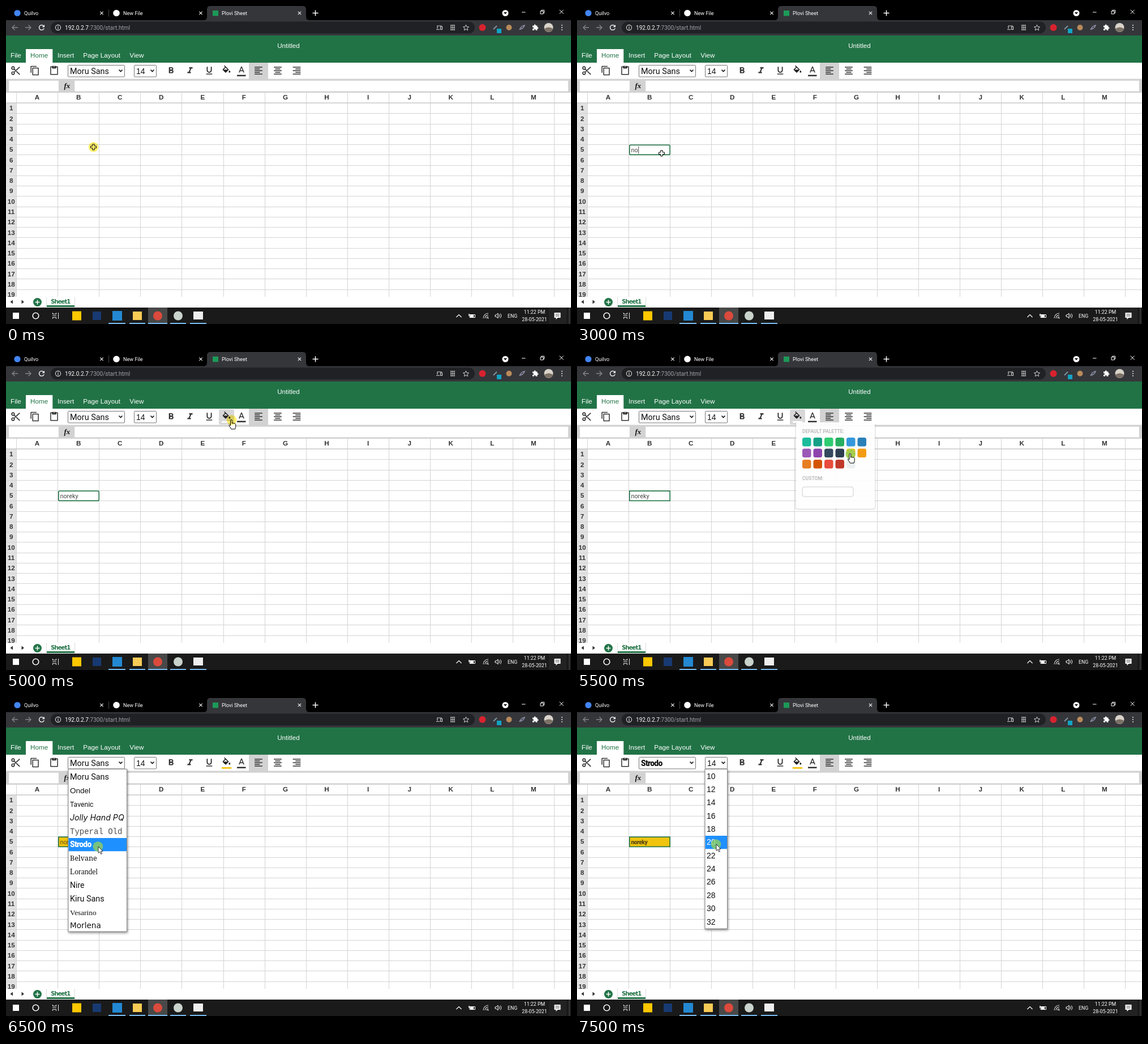
Recreate the animation shown at these times as an HTML page. Size 998x561 px, loop 8000 ms.

```html
<!DOCTYPE html>
<html lang="en">
<head>
<meta charset="utf-8">
<title>Spreadsheet</title>
<style>
html, body { margin: 0; width: 100%; height: 100%; overflow: hidden; background: #fff; }
svg { display: block; width: 100%; height: 100%; }
text { white-space: pre; }
.glow { mix-blend-mode: multiply; }
.shadow { filter: drop-shadow(1.5px 2px 2px rgba(0, 0, 0, .45)); }
</style>
</head>
<body>
<svg id="stage" viewBox="0 0 998 561"><g id="base"></g><g id="live"></g></svg>
<script>
const UI = 'Roboto, sans-serif';
const SANS = '"Liberation Sans", sans-serif';
const SERIF = '"Liberation Serif", serif';
const GREEN = '#217346', INK = '#333', YELLOW = '#f1c40f', GRAY = '#d2d2d2';
const COL = 73.06, ROW = 18.26, GRID_X = 18.7, GRID_Y = 171.5, LABEL = 11.69;

const rect = (x, y, w, h, fill, more = '') =>
  `<rect x="${x}" y="${y}" width="${w}" height="${h}" fill="${fill}" ${more}/>`;
const disc = (x, y, r, fill, more = '') =>
  `<circle cx="${x}" cy="${y}" r="${r}" fill="${fill}" ${more}/>`;
const fillPath = (d, fill, more = '') => `<path d="${d}" fill="${fill}" ${more}/>`;
const line = (d, color, width = 1, more = '') =>
  `<path d="${d}" fill="none" stroke="${color}" stroke-width="${width}" ${more}/>`;
const text = (s, x, y, size, fill, font = UI, more = '') =>
  `<text x="${x}" y="${y}" font-size="${size}" fill="${fill}" style='font-family:${font}' ${more}>${s}</text>`;
const at = (x, y, body, k = 1) => `<g transform="translate(${x} ${y}) scale(${k})">${body}</g>`;
// Icon drawn on a 24 unit box, centred on x, y
const icon = (x, y, body, k = 0.76) => at(x - 12 * k, y - 12 * k, body, k);
const MID = 'text-anchor="middle"';
const BOLD_MID = MID + ' font-weight="700"';

const ICONS = {
  cut: line('M8.5 8.5L21.5 21M8.5 15.5L21.5 3.5M3 6a3 3 0 1 0 6 0a3 3 0 1 0-6 0M3 18a3 3 0 1 0 6 0a3 3 0 1 0-6 0', INK, 2.2),
  copy: line('M3 17V2H16M7 6H20V22H7Z', INK, 2, 'stroke-linejoin="round"'),
  paste: line('M4 3H20V21H4Z', INK, 2, 'stroke-linejoin="round"') + rect(7, 1, 10, 6, INK, 'rx="1"') + disc(12, 3, 1, '#fff'),
  bold: fillPath('M15.6 10.79c.97-.67 1.65-1.77 1.65-2.79 0-2.26-1.75-4-4-4H7v14h7.04c2.09 0 3.71-1.7 3.71-3.79 0-1.52-.86-2.82-2.15-3.42zM10 6.5h3c.83 0 1.5.67 1.5 1.5s-.67 1.5-1.5 1.5h-3v-3zm3.5 9H10v-3h3.5c.83 0 1.5.67 1.5 1.5s-.67 1.5-1.5 1.5z', INK),
  italic: fillPath('M10 4v3h2.21l-3.42 8H6v3h8v-3h-2.21l3.42-8H18V4z', INK),
  underline: fillPath('M12 17c3.31 0 6-2.69 6-6V3h-2.5v8c0 1.93-1.57 3.5-3.5 3.5S8.5 12.93 8.5 11V3H6v8c0 3.31 2.69 6 6 6zm-7 2v2h14v-2H5z', INK),
  bucket: fillPath('M16.56 8.94L7.62 0 6.21 1.41l2.38 2.38-5.15 5.15c-.59.59-.59 1.54 0 2.12l5.5 5.5c.6.6 1.5.6 2.12 0l5.5-5.5c.59-.58.59-1.53 0-2.12zM10 5.2L14.8 10H5.2zM19 11.5s-2 2.17-2 3.5c0 1.1.9 2 2 2s2-.9 2-2c0-1.33-2-3.5-2-3.5z', '#222'),
  color: fillPath('M11 3L5.5 17h2.25l1.12-3h6.25l1.12 3h2.25L13 3h-2zm-1.38 9L12 5.67 14.38 12H9.62z', INK),
  reload: fillPath('M17.65 6.35C16.2 4.9 14.21 4 12 4c-4.42 0-8 3.58-8 8s3.57 8 8 8c3.73 0 6.84-2.55 7.73-6h-2.08c-.82 2.33-3.04 4-5.65 4-3.31 0-6-2.69-6-6s2.69-6 6-6c1.66 0 3.14.69 4.22 1.78L13 11h7V4l-2.35 2.35z', '#fff'),
  puzzle: fillPath('M20.5 11H19V7c0-1.1-.9-2-2-2h-4V3.5C13 2.1 11.9 1 10.5 1S8 2.1 8 3.5V5H4c-1.1 0-2 .9-2 2v3.8h1.5a2.7 2.7 0 0 1 0 5.4H2V20c0 1.1.9 2 2 2h3.8v-1.5a2.7 2.7 0 0 1 5.4 0V22H17c1.1 0 2-.9 2-2v-4h1.5a2.5 2.5 0 0 0 0-5z', '#fff'),
  star: line('M12 3l2.7 6.3 6.8.6-5.2 4.5 1.6 6.7-5.9-3.6-5.9 3.6 1.6-6.7-5.2-4.5 6.8-.6z', '#ddd', 1.8),
};
const alignIcon = side => [18, 12, 18, 12, 18]
  .map((w, i) => rect(3 + (18 - w) * side, 3 + 4 * i, w, 2, INK)).join('');

function browser() {
  const close = x => line(`M${x - 2.7} 9.8l5.4 5.4m0-5.4l-5.4 5.4`, '#eee', 1.2);
  let s = rect(0, 0, 998, 26, '#000') + rect(0, 25, 998, 27, '#35363a');
  s += fillPath('M349 25q6 0 6-6V6q0-6 6-6H524q6 0 6 6V19q0 6 6 6z', '#35363a');
  s += rect(181, 6, 1, 13, '#4a4c50');
  s += disc(20, 12.5, 5.6, '#4285f4') + disc(195, 12.5, 5.8, '#fff') + rect(365, 8, 10, 9.5, '#1d9a58');
  s += text('Quilvo', 32, 15.8, 9.1, '#fff') + text('New File', 207, 15.8, 9.1, '#fff') + text('Plovi Sheet', 381, 15.8, 9.1, '#fff');
  s += [169, 344, 518.5].map(close).join('') + line('M541.5 12.5h10M546.5 7.5v10', '#fff', 1.5);
  s += disc(882, 12.5, 5.5, '#fff') + fillPath('M879 11h6l-3 3.5z', '#000');
  s += line('M911 11h6.500M944 9h5v5h-5zM945.7 9V7.300h5v5h-1.700M977.700 6.700l7 7m0-7l-7 7', '#fff');
  s += line('M21 38H11m4.500-4.500L11 38l4.500 4.500M34 38h10m-4.500-4.500L44 38l-4.500 4.500', '#85878b', 1.3);
  s += icon(63, 38, ICONS.reload, 0.63) + rect(79, 27.5, 749, 21, '#202124', 'rx="10.5"');
  s += disc(92, 38, 4.6, 'none', 'stroke="#ddd" stroke-width="1.100"') + rect(91.4, 37.2, 1.2, 3.5, '#ddd') + rect(91.4, 35, 1.2, 1.3, '#ddd');
  s += text('192.0.2.7<tspan fill="#9aa0a6">:7300/start.html</tspan>', 104, 41.6, 10.1, '#fff');
  s += line('M762 40v-5h8M760 41.500h6M767.500 36.500h3v5h-3z', '#ccc', 1.2);
  s += line('M785 34h8M785 38h8M785 42h8M786 33v10M792 33v10M789 33v10', '#bbb', 1.1);
  s += icon(812.5, 38, ICONS.star, 0.53);
  s += disc(841.5, 38, 6, '#d8232f') + line('M861 41l6-6', '#7f94a4', 2) + rect(867, 40, 8, 8, '#12a4c4');
  s += disc(888.5, 38, 5, '#b98a5a') + line('M907 42q3-7 9-8q-2 6-8 7', '#8d90a8', 1.6);
  s += icon(935, 38, ICONS.puzzle, 0.5) + disc(958.5, 38, 8, '#d9d3ca') + fillPath('M950.800 40q8-5 15.400 0a8 8 0 0 1-15.400 0z', '#7b7166');
  return s + [34, 38, 42].map(y => disc(982, y, 1.1, '#ddd')).join('');
}

function toolbar() {
  let s = rect(0, 52, 998, 48, GREEN) + text('Untitled', 499, 74, LABEL, '#fff', SANS, MID);
  s += rect(35, 76, 47.3, 24, '#fff');
  [['File', 8], ['Home', 43], ['Insert', 91], ['Page Layout', 136.3], ['View', 218.3]]
    .forEach(([label, x]) => s += text(label, x, 91.2, LABEL, x === 43 ? GREEN : '#fff', SANS));
  s += rect(0, 100, 998, 29, '#fff') + rect(429, 100, 34, 29, GRAY);
  [['cut', 17], ['copy', 51], ['paste', 85], ['bold', 291.5], ['italic', 325], ['underline', 359], ['color', 416]]
    .forEach(([name, x]) => s += icon(x, name === 'color' ? 113.5 : 114, ICONS[name]));
  s += rect(408, 121.5, 15.5, 2.5, INK);
  [446, 480, 513.5].forEach((x, i) => s += icon(x, 114, alignIcon(i / 2)));
  s += rect(0, 128.5, 998, 24.5, GRAY) + rect(5.2, 131.8, 87.7, 18.6, '#fff') + rect(121.2, 131.8, 871.6, 18.6, '#fff');
  return s + text('fx', 102.5, 145, 13, '#111', SERIF, 'font-style="italic" font-weight="700"');
}

function grid() {
  let s = rect(0, 153, 998, 360, '#fff') + rect(0, 171, 18, 342, '#e2e2e2');
  for (let c = 0; c < 14; c++) {
    const x = GRID_X + c * COL;
    s += line(`M${Math.floor(x) + 0.5} 153V513`, '#d4d4d4');
    if (c < 13) s += text(String.fromCharCode(65 + c), x + 36.4, 165, LABEL, INK, SANS, BOLD_MID);
  }
  for (let r = 0; r < 19; r++) {
    const y = GRID_Y + r * ROW;
    s += line(`M0 ${Math.floor(y) + (r ? 0.5 : 0)}H998`, r ? '#d4d4d4' : '#c8c8c8', r ? 1 : 1.4);
    s += text(r + 1, 9.2, y + 12.9, LABEL, INK, SANS, BOLD_MID);
  }
  s += rect(0, 513, 998, 19, '#fff') + fillPath('M12 518.500v7l-4.500-3.500zM27.500 518.500v7l4.500-3.500z', INK);
  s += disc(55.5, 522.5, 7.5, GREEN) + line('M51.500 522.500h8M55.500 518.500v8', '#fff', 1.5);
  s += line('M71.500 513v18M121.500 513v18', '#ddd') + rect(72, 528, 49, 3, GREEN);
  return s + text('Sheet1', 96.3, 525.3, 10, GREEN, '"DejaVu Sans", sans-serif', BOLD_MID + ' letter-spacing="-.900"');
}

function taskbar() {
  let s = rect(0, 532, 998, 29, '#1a1a1a') + rect(251, 532, 34, 29, '#484848') + rect(959, 532, 31, 29, '#222');
  s += rect(12, 541, 11, 11, '#fff') + disc(52.5, 546.5, 5.3, 'none', 'stroke="#fff" stroke-width="1.600"');
  s += line('M82.500 541v2.500h6V541M82.500 552v-2.500h6V552M82 546.500h7M92.500 541v11', '#ddd', 1.1);
  s += rect(117, 538.5, 16, 16, '#fdc800') + rect(153, 539, 15, 15, '#183a72') + rect(188, 538, 17, 17, '#2388d1');
  s += rect(224, 539, 16, 15, '#f7cb55') + disc(268, 546.5, 8, '#db4a3c') + disc(304, 546.5, 8, '#c9d3cc') + rect(331, 539, 17, 14, '#eee');
  [[181, 30], [218, 28], [251, 34], [290, 28], [325, 29]].forEach(([x, w]) => s += rect(x, 559, w, 2, '#76b9ed'));
  s += line('M795.500 549l4.500-4.500 4.500 4.500', '#fff', 1.2);
  s += line('M819 544.500h9.500v5H819z', '#fff') + rect(820, 545, 6, 4, '#fff') + line('M818 543v4', '#fff', 1.5);
  s += line('M843 551a9 9 0 0 1 9-9M846 551a6 6 0 0 1 6-6M849 551a3 3 0 0 1 3-3', '#ddd', 1.1) + disc(851.5, 550.5, 1, '#fff');
  s += line('M864 545h2l3-3v9l-3-3h-2zM871 544q2 2.500 0 5M873 542.500q3.500 4 0 8', '#fff');
  s += text('ENG', 886, 549.7, 8.8, '#fff') + text('11:22 PM', 933.5, 542.5, 8.8, '#fff', UI, MID) + text('28-05-2021', 933.5, 555.5, 8.8, '#fff', UI, MID);
  s += fillPath('M968.500 541h11v9h-5l-3 3v-3h-3z', '#fff') + line('M970.500 543.800h7M970.500 546.800h7', '#333');
  return s + rect(994.5, 532, 1, 29, '#555');
}

const WORD = 'noreky';
const CARETS = [96.2, 100.5, 108.3, 114.3, 119, 124.3, 127];
const HEAVY = 'font-weight="900" letter-spacing="-.700"';
const FACES = [
  ['Moru Sans', UI, 14.4], ['Ondel', SANS, 13.5], ['Tavenic', UI, 12.2],
  ['Jolly Hand PQ', 'Inter, sans-serif', 14.2, 'font-style="italic"'],
  ['Typeral Old', '"Liberation Mono", monospace', 14, 'opacity=".75"'],
  ['Strodo', UI, 13.8, HEAVY], ['Belvane', '"Noto Serif", serif', 12.5], ['Lorandel', SERIF, 13.6],
  ['Nire', UI, 14], ['Kiru Sans', UI, 14.4], ['Vesarino', SERIF, 13.3], ['Morlena', '"DejaVu Sans", sans-serif', 13.6],
];
const SIZES = Array.from({ length: 12 }, (_, i) => [10 + 2 * i, SANS, 14]);
const SWATCHES = '1abc9c 16a085 2ecc71 27ae60 3498db 2980b9 9b59b6 8e44ad 34495e 2c3e50 f1c40f f39c12 e67e22 d35400 e74c3c c0392b ecf0f1'.split(' ');

function select(x, w, [label, font, size, more]) {
  return rect(x + 0.5, 104.5, w, 20.5, '#fff', 'stroke="#767676" rx="1"') +
    text(label, x + 4, 119.8, size, '#111', font, more) +
    line(`M${x + w - 9.5} 112.500l3 3 3-3`, '#111', 1.6);
}

function menu(x, w, h, first, step, items) {
  let s = rect(x + 0.5, 125.5, w - 1, h, '#fff', 'stroke="#888" class="shadow"');
  items.forEach(([label, font, size, more], i) => {
    const y = first + i * step;
    if (i === 5) s += rect(x + 1, Math.round(y - step / 2), w - 2, 23.3, '#1e90ff');
    s += text(label, x + 3.5, y + 4.9, size, i === 5 ? '#fff' : '#111', font, more);
  });
  return s;
}

function palette() {
  let s = rect(385, 125, 143, 154, '#000', 'opacity=".08" rx="5"') + rect(387, 124, 139, 152, '#fff', 'opacity=".94" rx="4"');
  s += text('DEFAULT PALETTE:', 398, 143, 8.5, '#bbb', UI, 'font-weight="700"');
  SWATCHES.forEach((c, i) => s += rect(398 + i % 6 * 19.5, 151 + Math.floor(i / 6) * 19.5, 15.5, 15.5, '#' + c, 'rx="3.500"'));
  s += text('CUSTOM:', 398, 226, 8.5, '#bbb', UI, 'font-weight="700"');
  return s + rect(398, 238, 90, 17, '#fff', 'rx="3.500" stroke="#ccc"');
}

const POINTERS = {
  cross: fillPath('M-1.700-5h3.400v3.300h3.300v3.400h-3.300v3.300h-3.400v-3.300h-3.300v-3.400h3.300z', '#fff', 'stroke="#000" stroke-width="1"'),
  arrow: fillPath('M.5 0V11.500L3.200 9l1.900 4.400 1.900-.800L5.100 8.300H8.500z', '#fff', 'stroke="#000" stroke-width=".800"'),
  hand: fillPath('M-2 0q1.500-1.500 2.700 0V6l1.800-.600 1.500.700 1.800-.200 1.400 1.500v5l-1.200 3.600H-.500L-4.600 9.500q0-2 2.600.300z', '#fff', 'stroke="#000" stroke-width="1" stroke-linejoin="round"'),
};
const IDLE = 1, PRESSED = 2;

// The idle glow tints the pointer, the click mark lies below it
function pointer([kind, x, y, mark]) {
  const shape = at(x, y, POINTERS[kind]);
  if (mark === PRESSED) return disc(x, y, 8.8, '#8fcf5e', 'opacity=".8"') + shape;
  return shape + (mark ? disc(x, y, 8.8, '#fff06e', 'class="glow"') : '');
}

// One entry per half second: kind, x, y, mark
const POINTER_STEPS = [
  ['cross', 154.5, 248.8, IDLE], ['cross', 149.5, 259.8, IDLE], ['cross', 149.5, 259.8, PRESSED], ['cross', 149.5, 259.8, IDLE],
  ...Array(6).fill(['cross', 149.5, 259.8, 0]),
  ['hand', 398.5, 120, IDLE], ['hand', 483, 180, PRESSED], ['arrow', 207, 124.5, IDLE],
  ['arrow', 162.5, 262, PRESSED], ['arrow', 261, 116, IDLE], ['arrow', 245.5, 258, PRESSED],
];
const TYPED = [0, 0, 0, 0, 0, 1, 2, 3, 5, 5];

function cell(step) {
  if (!step) return '';
  const filled = step >= 12, editing = step >= 3 && step <= 10;
  const n = step < TYPED.length ? TYPED[step] : WORD.length;
  const heavy = step >= 14;
  let s = rect(92.8, 245.2, 71.4, 17.2, filled ? YELLOW : '#fff', `stroke="${GREEN}" stroke-width="1.600" rx="${editing ? 2 : 0}"`);
  s += text(WORD.slice(0, n), 95.5, 257.8, heavy ? 10.4 : 10.8, filled ? '#5a4a18' : '#444', UI, heavy ? 'font-weight="900" letter-spacing="-.600"' : '');
  if (step === 3 || (step >= 5 && step <= 9)) s += rect(CARETS[n], 247.5, 0.9, 13, '#333');
  return s;
}

function live(step) {
  let s = cell(step);
  const hover = step === 10 || step === 11;
  if (hover) s += rect(376, 101, 27, 27, '#d8d8d8', 'rx="3"');
  s += icon(389.5, 113.8, ICONS.bucket) + rect(381, 122, 17, 2.8, step >= 12 ? YELLOW : '#fff');
  s += select(109, 100, FACES[step >= 14 ? 5 : 0]) + select(226, 39, SIZES[2]);
  if (step === 11) s += palette();
  if (step === 13) s += menu(109.5, 104.5, 286.5, 139.4, 23.82, FACES);
  if (step === 15) s += menu(225.5, 40.5, 281.5, 137.7, 23.36, SIZES);
  return s + pointer(POINTER_STEPS[step]);
}

document.getElementById('base').innerHTML = grid() + browser() + toolbar() + taskbar();
const layer = document.getElementById('live');
const start = performance.now();
let shown = -1;
function tick() {
  const step = Math.floor((performance.now() - start) % 8000 / 500);
  if (step !== shown) layer.innerHTML = live(shown = step);
  requestAnimationFrame(tick);
}
tick();
</script>
</body>
</html>
```
